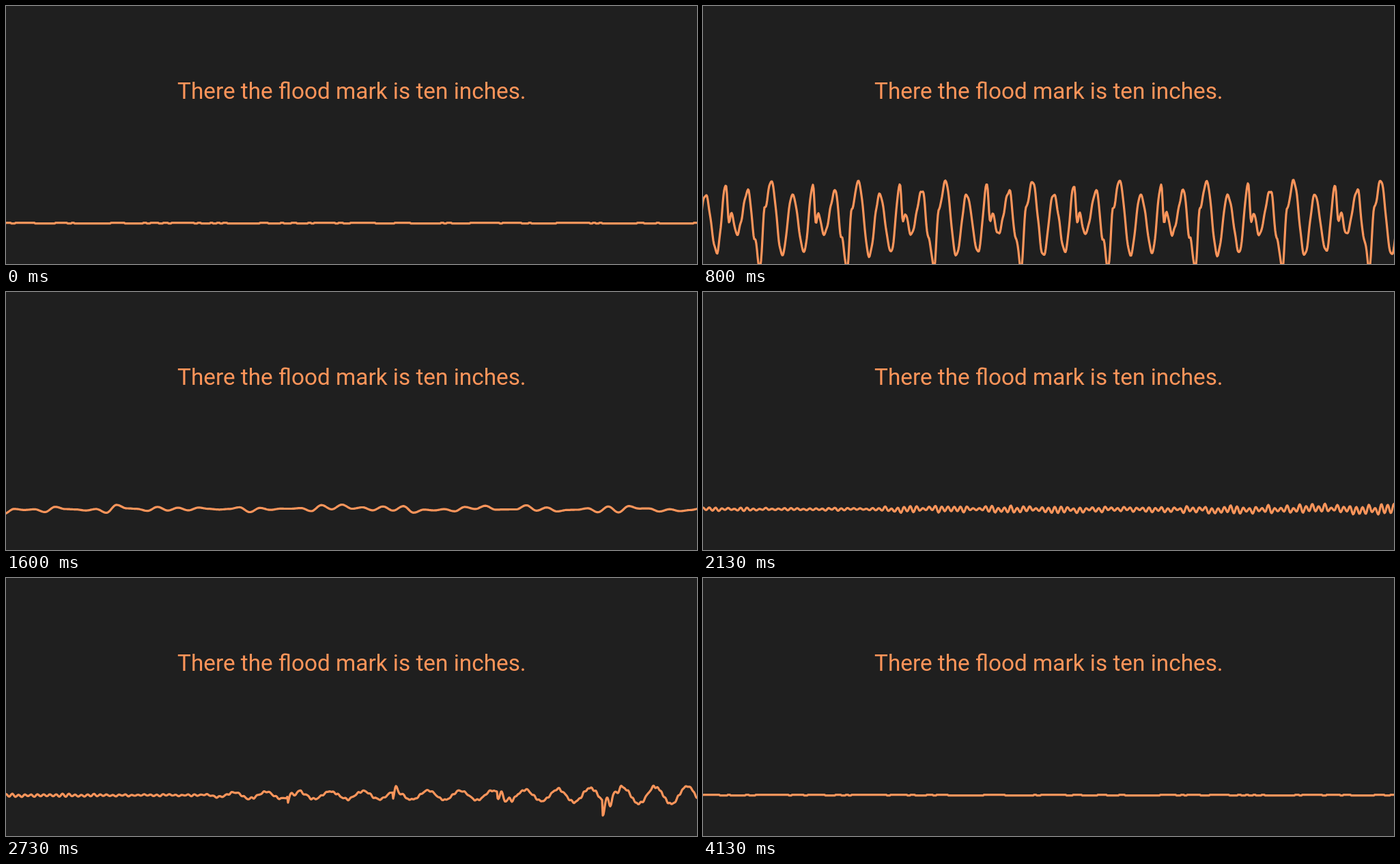
Animation, 1012 px wide and 378 px high, one loop 4200 ms. Source, as an HTML page:

```html
<!DOCTYPE html>
<html lang="en">
<head>
<meta charset="utf-8">
<title>Spoken sentence</title>
<style>
  html, body { margin: 0; width: 100%; height: 100%; overflow: hidden; background: #1f1f1f; }
  svg { display: block; width: 1012px; height: 378px; }
  text { font: 33.33px Roboto, sans-serif; fill: #ff955a; }
  path { fill: none; stroke: #fb955b; stroke-width: 3.2; stroke-linejoin: round; }
</style>
</head>
<body>
<svg viewBox="0 0 1012 378">
  <text x="251" y="136">There the flood mark is ten inches.</text>
  <path id="wave"/>
</svg>
<script>
const WIDTH = 1012, MID = 318.3, FPS = 15, LOOP = 4200, PEAK = 64;
const path = document.getElementById('wave');

const random = i => {
  const v = Math.sin(i * 12.9898 + 4.1) * 43758.5453;
  return v - Math.floor(v);
};
const wrap = (x, size) => ((x % size) + size) % size;

// Eased value at x along key points [x, y]
function along(points, x) {
  const i = points.findIndex(p => p[0] > x);
  if (i < 1) return points[i < 0 ? points.length - 1 : 0][1];
  const [[x0, y0], [x1, y1]] = [points[i - 1], points[i]];
  return y0 + (y1 - y0) * (1 - Math.cos(Math.PI * (x - x0) / (x1 - x0))) / 2;
}

// Random peaks and dips that take turns, one per step
function zigzag(x, step, least) {
  const at = i => (i % 2 ? 1 : -1) * (least + (1 - least) * random(i));
  const i = Math.floor(x / step);
  return along([[0, at(i)], [1, at(i + 1)]], x / step - i);
}

// One pitch period of the open vowel
const CYCLE = [
  [0, -62], [16, 47], [31, -42], [48, 42], [61, -56], [65.5, -2], [69, -15],
  [77, 16], [94, -48], [103, 22], [111, 66], [118, -22], [127.5, -62]
];

// Sounds take n, the place in the whole recording in pixels
const openVowel = n => along(CYCLE, wrap(n - 12 * WIDTH - 100, 127.5)) + 3 * zigzag(n, 3, 0);

function softVowel(n) {
  const x = n - 41 * WIDTH;
  const pulse = Math.exp(-wrap(x - 720, 153.5) / 11);
  return -.55 * Math.cos((x - 998) / 47.5 * 2 * Math.PI) + 1.3 * pulse * zigzag(x, 5.5, .3)
    + .08 * zigzag(x, 3, 0);
}
const murmur = n => zigzag(n, 15, -.2);
const hiss = n => zigzag(n, 4.6, .2);

// Loudness of each sound over the steps of the loop
const TRACKS = [
  [openVowel, [[9, 0], [10, .6], [12, 1], [15, 1], [17, .6], [20, 1], [23, .4], [24, 0],
    [25, 0], [27, 1], [30, .6], [32, 0], [33, 0], [35, 1], [38, .8], [40, 0]]],
  [softVowel, [[41.26, 0], [41.36, 9], [41.65, 12], [42, 24], [44, 34], [45, 30], [47, 0]]],
  [murmur, [[23, 0], [24, 7], [25, 7], [26, 0]]],
  [hiss, [[9, 0], [9.5, 2], [10, 0], [31, 0], [32, 2.6], [32.22, 2.2], [32.3, 5.5],
    [32.6, 5.5], [33, 8.5], [34, 0], [39, 0], [40, 6], [41, 2.6], [41.3, 1.5], [45, 2],
    [46, 12], [49, 0]]]
];

// The silent line flips at random between two close levels
function quietPath(slot) {
  let d = `M-4 ${MID}`;
  for (let x = 0, i = slot * 97; x < WIDTH; i++) {
    d += `L${x + 1} ${MID + (i % 2 ? .4 : -.6)}`;
    x += 4 + 50 * random(i) ** 3;
    d += `H${x}`;
  }
  return d;
}

function soundPath(slot) {
  const points = [];
  for (let x = -2; x <= WIDTH + 2; x++) {
    const time = slot + x / WIDTH;
    const sum = TRACKS.reduce((y, [sound, level]) => y + along(level, time) * sound(time * WIDTH), 0);
    const y = Math.max(-PEAK, Math.min(PEAK, sum));
    points.push(`${x} ${(MID + y).toFixed(1)}`);
  }
  return 'M' + points.join('L');
}

let shown = -1;
const start = performance.now();
function draw(now) {
  const time = Math.max(0, now - start) % LOOP;
  const slot = Math.floor((time + 4) * FPS / 1000) % (LOOP * FPS / 1000);
  if (slot !== shown) {
    path.setAttribute('d', slot < 9 || slot > 48 ? quietPath(slot) : soundPath(slot));
    shown = slot;
  }
  requestAnimationFrame(draw);
}
draw(start);
</script>
</body>
</html>
```
